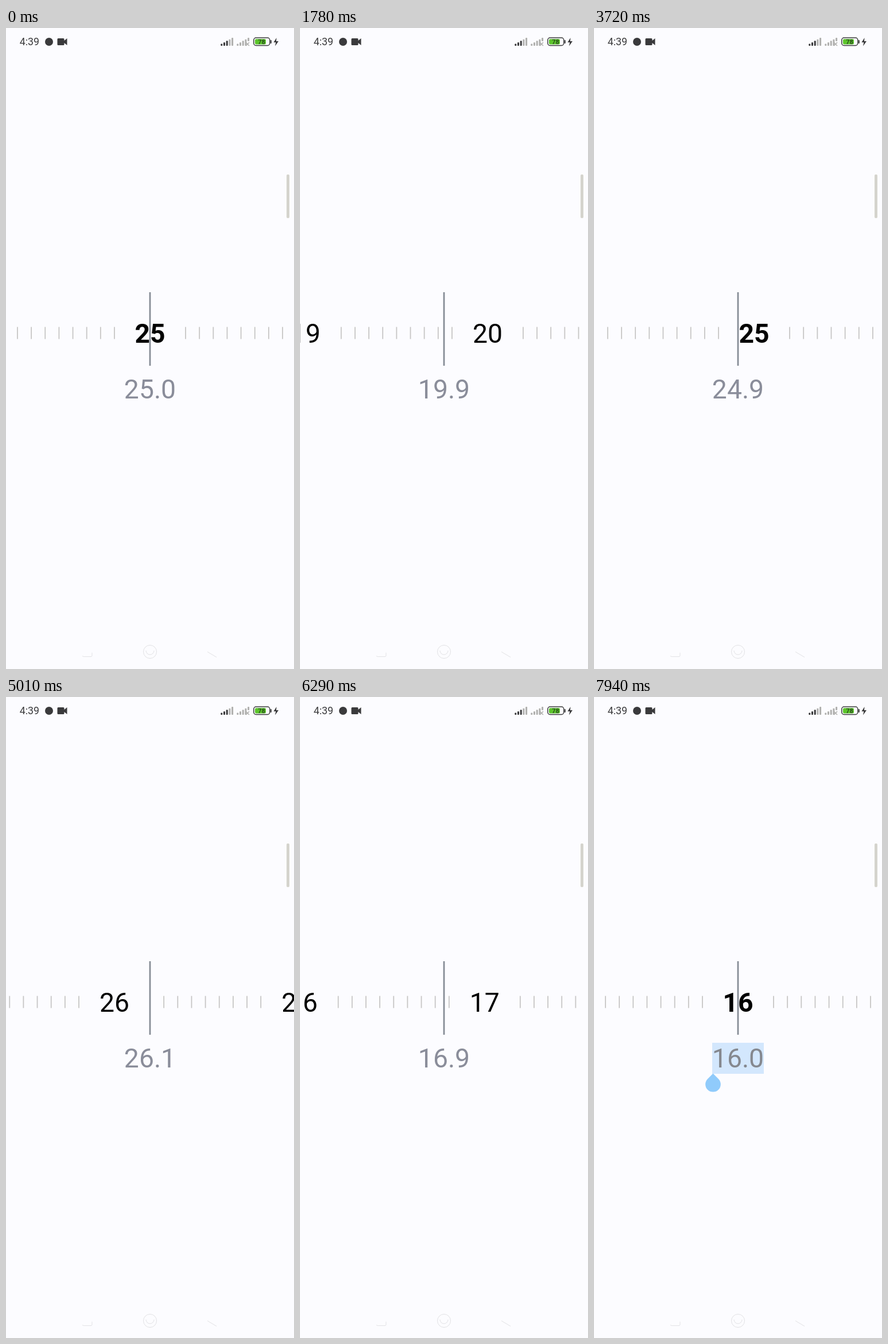
These frames come from a looping animation (502 by 1116 pixels, 7990 ms). An HTML page:

```html
<!DOCTYPE html>
<html lang="en">
<head>
<meta charset="utf-8">
<title>Ruler picker</title>
<style>
  html, body { margin: 0; width: 100%; height: 100%; overflow: hidden; background: #fcfcff; }
  svg { display: block; width: 502px; height: 1116px; }
  text { font-family: Roboto, sans-serif; }
  #label, #ruler text { font-size: 46.3px; text-anchor: middle; }
</style>
</head>
<body>
<svg viewBox="0 0 502 1116">
  <rect width="502" height="1116" fill="#fcfcff"/>

  <!-- Status bar -->
  <g fill="#3a3a3c">
    <text x="23.8" y="30.3" font-size="17.8">4:39</text>
    <circle cx="75" cy="24" r="7"/>
    <path d="M91 18h9q1.500 0 1.500 1.500v2.500l5-4v12l-5-4v2.500q0 1.500-1.500 1.500h-9q-1.500 0-1.500-1.500v-9q0-1.500 1.500-1.500z"/>
    <path d="M471.500 17l-5 8h3.800l-1.300 6.500 6-8.500h-4z"/>
    <rect x="460.800" y="21" width="2" height="6" rx="1"/>
  </g>
  <g id="signals"></g>
  <path d="M418 25l6 6m0-6l-6 6" stroke="#b0b0ae" stroke-width="1.600"/>
  <rect x="431.800" y="17" width="28" height="13.500" rx="4" fill="none" stroke="#3a3a3c" stroke-width="1.500"/>
  <rect x="434" y="19.200" width="19" height="9.200" rx="2" fill="#5cc52b"/>
  <text x="445.500" y="27.800" font-size="11" font-weight="700" text-anchor="middle" fill="#294f1c">78</text>

  <rect x="489" y="255" width="5" height="76" rx="2" fill="#d5d4cd"/>

  <!-- Ruler and value -->
  <g id="ruler"></g>
  <rect x="249.600" y="460" width="2.800" height="128" fill="#878d97"/>
  <g id="selection">
    <rect x="206" y="602" width="90" height="54" fill="#d3e7fd"/>
    <path d="M207.500 655.500L217 665A13.300 13.300 0 1 1 198 665Z" fill="#90cbfb"/>
  </g>
  <text id="label" x="251" y="644.800" fill="#8a8d9a"></text>

  <!-- Navigation bar -->
  <g fill="none" stroke="#e2e2e5">
    <path d="M133.500 1093q0 1.500 2 1.500h12.500q2 0 2-2v-5"/>
    <circle cx="251" cy="1086" r="11.500"/>
    <path d="M244 1084a7 7 0 1 0 14 0"/>
    <path d="M351 1086l16 9.500"/>
  </g>
</svg>
<script>
const LOOP = 7990, CENTER = 251, UNIT = 317.2, GAP = 62, STEP = 24.15;
const LABEL_LAG = 17, SELECT_AT = 7820;
const $ = id => document.getElementById(id);

function add(parent, tag, attrs) {
  const el = document.createElementNS('http://www.w3.org/2000/svg', tag);
  for (const key in attrs) el.setAttribute(key, attrs[key]);
  return parent.appendChild(el);
}

for (const [left, dark] of [[374.3, 3], [402.3, 0]])
  for (let i = 0; i < 5; i++) {
    const height = 3.5 + i * 2.6;
    add($('signals'), 'rect', {
      x: left + i * 4.7, y: 31 - height, width: 3, rx: 1,
      height: !dark && i === 4 ? 6 : height,
      fill: i < dark ? '#3a3a3c' : '#b0b0ae'
    });
  }

// Distance along the ruler of whole number n, or of its k-th tick.
const place = (n, k = 0) => n * UNIT + (k && GAP + (k - 1) * STEP);

const numbers = [];
for (let n = 14; n <= 28; n++) {
  const text = add($('ruler'), 'text', { x: place(n), y: 547.5 });
  text.textContent = n;
  numbers.push({ n, text });
  for (let k = 1; k <= 9; k++)
    add($('ruler'), 'rect', { x: place(n, k) - 0.9, y: 520.5, width: 1.8, height: 21, fill: '#c7c6c5' });
}

const flings = [
  { start: 1150, end: 2570, power: 2.97, from: place(25), to: place(18, 7) },
  { start: 3200, end: 4700, power: 4.15, from: place(18, 7), to: place(26, 1) },
  { start: 5250, end: 7600, power: 4.4, from: place(26, 1), to: place(16) }
];

function positionAt(time) {
  let position = flings[0].from;
  for (const { start, end, power, from, to } of flings)
    if (time >= start) {
      const left = Math.max(0, 1 - (time - start) / (end - start));
      position = to + (from - to) * left ** power;
    }
  return position;
}

const isCentered = (n, position) => Math.abs(place(n) - position) < GAP - STEP / 2;

function reading(position) {
  const nearest = Math.round(position / UNIT);
  if (isCentered(nearest, position)) return nearest + '.0';
  const n = Math.floor(position / UNIT);
  const k = Math.round((position - place(n) - GAP) / STEP) + 1;
  return n + '.' + Math.min(9, Math.max(1, k));
}

function draw(now) {
  const time = now % LOOP, position = positionAt(time);
  $('ruler').setAttribute('transform', `translate(${CENTER - position} 0)`);
  for (const { n, text } of numbers)
    text.setAttribute('font-weight', isCentered(n, position) ? 700 : 400);
  $('label').textContent = reading(positionAt(time - LABEL_LAG));
  $('selection').style.display = time >= SELECT_AT ? '' : 'none';
  $('label').setAttribute('fill', time >= SELECT_AT ? '#85888f' : '#8a8d9a');
}

function tick() {
  draw(performance.now());
  requestAnimationFrame(tick);
}
tick();
</script>
</body>
</html>
```
